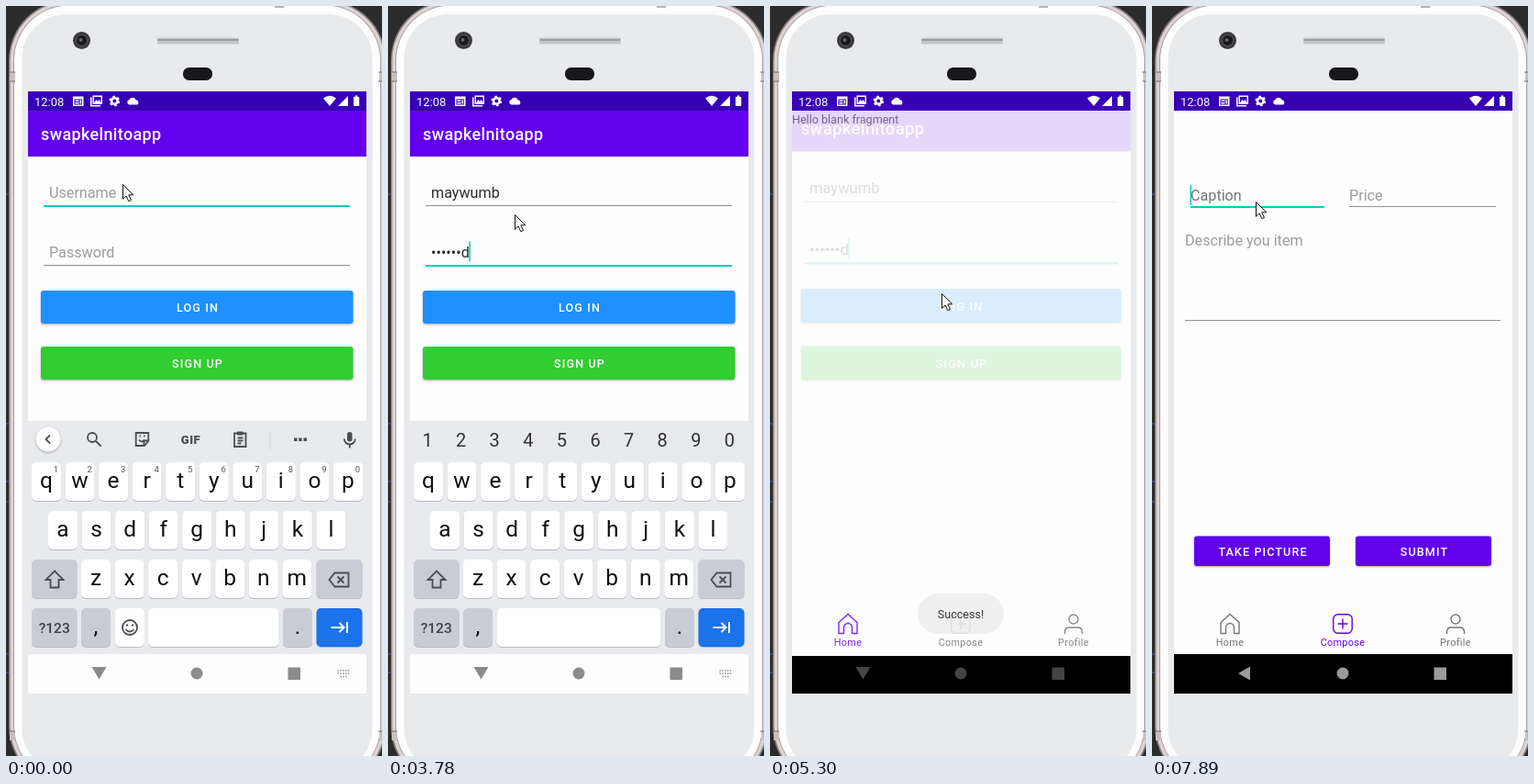
An HTML page that plays this animation: 410x817 px, repeating every 8000 ms.

```html
<!DOCTYPE html>
<html lang="en">
<head>
<meta charset="utf-8">
<title>App login</title>
<style>
html, body { margin: 0; width: 100%; height: 100%; overflow: hidden; background: #2b2b2b; }
svg { display: block; width: 410px; height: 817px; font-family: Roboto, sans-serif; }
text { white-space: pre; }
.mid { text-anchor: middle; }
.field { font-size: 16.16px; fill: #2b2b2b; }
.hint { fill: #9c9c9c; }
.btn { font-size: 12.57px; font-weight: 500; letter-spacing: 1.12px; fill: #fff; text-anchor: middle; }
.tab { font-size: 10.8px; letter-spacing: .36px; text-anchor: middle; fill: currentColor; }
.key { font-size: 24.5px; fill: #111; text-anchor: middle; }
.mode { font-size: 15.5px; font-weight: 500; fill: #3c4043; text-anchor: middle; }
.small { font-size: 9.5px; fill: #555; text-anchor: middle; }
.word { font-size: 16px; fill: #4a4d51; text-anchor: middle; }
.line { fill: none; stroke: #4a4d51; stroke-width: 1.8; }
.thin { fill: none; stroke: currentColor; stroke-width: 1.4; stroke-linejoin: round; }
.drop { filter: drop-shadow(0 1px .8px rgba(0,0,0,.33)); }
</style>
</head>
<body>
<svg viewBox="0 0 410 817">
  <defs><clipPath id="screen"><rect x="24" y="93" width="369" height="656"/></clipPath></defs>

  <g id="phone">
    <path d="M0 205h3M0 455h3M0 518h3M0 540h3M0 706h3M0 726h3" stroke="#4d63a8"/>
    <rect x="3" y="-6" width="411" height="856" rx="65" fill="#837b7c"/>
    <rect x="4.500" y="-4.500" width="408" height="853" rx="64" fill="#ddd3d3"/>
    <rect x="8" y="-1.500" width="401" height="847" rx="61" fill="#aaa1a2"/>
    <rect x="9" y="-.5" width="399" height="845" rx="60" fill="#fdfdfd"/>
    <rect x="17.500" y="9" width="382" height="826" rx="48" fill="#e8eaec"/>
    <path d="M4 72h6v10H4zM407 72h5v10h-5zM4 790h6v10H4zM407 790h5v10h-5z" fill="#c8bfbf"/>
    <path d="M4 72h6M4 82h6M406 72h6M406 82h6M4 790h6M406 790h6M293 1h10" stroke="#746d6e"/>
    <circle cx="82.500" cy="37.500" r="9.500" fill="#3b3b3d"/>
    <circle cx="82.500" cy="37.500" r="6" fill="#19191b" stroke="#5c5c60"/>
    <circle cx="81.500" cy="37" r="2" fill="#65656b"/>
    <rect x="165" y="34.500" width="89" height="7" rx="1.500" fill="#c3c5c8"/>
    <path d="M165.500 37h88" stroke="#8d8f93" stroke-width="1.300"/>
    <rect x="193" y="67" width="32" height="14" rx="6.500" fill="#18181a"/>
  </g>

  <g clip-path="url(#screen)">
    <rect x="24" y="93" width="369" height="656" fill="#fdfdfd"/>
    <g id="login">
      <rect x="20" y="85" width="377" height="29" fill="#3700b3"/>
      <rect x="20" y="114" width="377" height="50" fill="#6200ee"/>
      <text x="38" y="146" font-size="18" font-weight="500" letter-spacing=".35" fill="#fff">swapkelnitoapp</text>
      <text id="user" class="field" x="47" y="208.500"></text>
      <text id="pass" class="field" x="47" y="273.500"></text>
      <rect id="userLine" x="41" width="334"/>
      <rect id="passLine" x="41" width="334"/>
      <rect id="compose" x="47" y="210" height="1" fill="#333"/>
      <rect id="caret" width="1.500" height="22" fill="#03cdb9"/>
      <rect id="loginBtn" class="drop" x="38" y="310" width="340.500" height="36" rx="3"/>
      <text class="btn" x="209" y="333">LOG IN</text>
      <rect class="drop" x="38" y="371" width="340.500" height="36" rx="3" fill="#32cd32"/>
      <text class="btn" x="209" y="394">SIGN UP</text>
    </g>

    <g id="main">
      <rect x="24" y="93" width="369" height="21" fill="#3700b3"/>
      <rect x="24" y="114" width="369" height="594" fill="#fdfdfd"/>
      <text id="home" x="24" y="128" font-size="12.570" fill="#777">Hello blank fragment</text>
      <g id="form">
        <text id="caption" class="field" x="42" y="212">Caption</text>
        <text class="field hint" x="215" y="212">Price</text>
        <text class="field hint" x="36" y="261">Describe you item</text>
        <rect id="captionLine" x="42" width="146"/>
        <path d="M215 218.500h160M36 342.500h344" stroke="#939393"/>
        <rect id="captionCaret" x="41.500" y="195" width="1.500" height="22" fill="#03cdb9"/>
        <rect class="drop" x="46" y="577.500" width="148" height="32.500" rx="3" fill="#6200ee"/>
        <rect class="drop" x="222" y="577.500" width="148" height="32.500" rx="3" fill="#6200ee"/>
        <text class="btn" x="121" y="599">TAKE PICTURE</text>
        <text class="btn" x="297" y="599">SUBMIT</text>
      </g>
      <circle id="ripple" cx="208" cy="679" r="31" fill="#6200ee" opacity=".1"/>
      <g id="homeTab">
        <path class="thin" d="M75 671.500 85 662.500l10 9V683.500H89.500V677a4.500 4.500 0 0 0-9 0v6.500H75z"/>
        <text class="tab" x="85" y="696.500">Home</text>
      </g>
      <g id="composeTab">
        <rect class="thin" x="197.700" y="662.700" width="20.500" height="20.500" rx="5"/>
        <path class="thin" d="M202.500 673h11M208 667.500v11"/>
        <text class="tab" x="208" y="696.500">Compose</text>
      </g>
      <g color="#757575">
        <circle class="thin" cx="331" cy="668" r="5"/>
        <path class="thin" d="M321.500 684v-2q0-5 5-5h9q5 0 5 5v2"/>
        <text class="tab" x="331" y="696.500">Profile</text>
      </g>
    </g>

    <g id="keyboard">
      <rect x="24" y="452" width="369" height="255" fill="#e8eaed"/>
      <g id="keys"></g>
      <g id="digits"></g>
      <g id="strip">
        <circle class="drop" cx="46" cy="472" r="13.500" fill="#fff"/>
        <path id="chevron" class="line"/>
        <rect x="372" y="464" width="5.500" height="10.500" rx="2.700" fill="#4a4d51"/>
        <path class="line" stroke-width="1.500" d="M368.800 471.500a6 6 0 0 0 12 0M374.800 477.500v4"/>
      </g>
      <g id="tools">
        <circle class="line" cx="94" cy="470" r="5"/><path class="line" stroke-width="2.200" d="m98 474 5.500 5.500"/>
        <path class="line" d="M141.700 465h13.600v9l-4.500 5h-9.100zM155 473.500h-4.500v5"/>
        <path class="line" d="M145 472.500q3 4 6 0M145.500 468.500h1.500M150 468.500h1.500" stroke-width="1.400"/>
        <text class="mid" x="201.500" y="476.500" font-size="13" font-weight="900" fill="#4a4d51" letter-spacing=".5">GIF</text>
        <path class="line" d="M249 465.500h12.500v14.500H249zM252.500 470.500h6M252.500 473.500h6M252.500 476.500h4" stroke-width="1.500"/>
        <path d="M252 463.500h6.500v4H252z" fill="#4a4d51"/>
        <path d="M288 463v20" stroke="#cfd1d5"/>
        <path d="M314 470.500h3.500v3.500H314zM319.200 470.500h3.500v3.500h-3.500zM324.500 470.500h3.500v3.500h-3.500z" fill="#4a4d51"/>
      </g>
      <g id="words">
        <text class="word" x="105" y="478.500"></text>
        <text class="word" x="207" y="478.500"></text>
        <text class="word" x="309" y="478.500"></text>
        <path d="M153.500 462v20M261.500 462v20" stroke="#c9cbcf"/>
      </g>
    </g>

    <g id="nav">
      <rect id="navBack" x="24" width="369" height="45"/>
      <path id="backIcon"/>
      <circle cx="208" cy="727" r="6.500"/>
      <rect x="307.500" y="720.500" width="13.500" height="13.500"/>
      <path id="imeIcon" d="M361.500 724h13M361.500 727h13M364.500 730.500h7" stroke="#8d8d8d" stroke-width="1.500" stroke-dasharray="1.600 1.200"/>
    </g>

    <g id="status" fill="#fff">
      <text x="31" y="108.500" font-size="13">12:08</text>
      <path fill-rule="evenodd" d="M73 98.500h11.500v10.500H73zM74.500 101.500v6h8.500v-6zM75.500 102.500h4v1.500h-4zM75.500 105h4v1.500h-4zM80.500 102.500h1.700v4h-1.700z"/>
      <path fill-rule="evenodd" d="M92 99.500h1.500v8.500h9.500v1.500H92zM94.500 97.500h10.500v9.500H94.500zM96 99v6.500h7.500V99zM96 105.500l2.500-3.500 1.700 2 1.500-2 1.800 3.500z"/>
      <circle cx="118.300" cy="103.500" r="3.300" fill="none" stroke="#fff" stroke-width="2.600"/>
      <circle cx="118.300" cy="103.500" r="5" fill="none" stroke="#fff" stroke-width="1.700" stroke-dasharray="2.620 2.620"/>
      <path d="M134.500 107.500a2.800 2.800 0 0 1 0-5.500 4 4 0 0 1 7.300.5 2.500 2.500 0 0 1 .2 5z"/>
      <path d="M346 100.500q7-5.500 14 0l-7 8.500zM362 109h11V98zM379 99h1.700v-1.500h2.600V99h1.900v10H379z"/>
    </g>

    <g id="toast">
      <rect x="161" y="640" width="94" height="44" rx="22" fill="#eee" fill-opacity=".95"/>
      <text class="mid" x="208" y="667" font-size="12.570" fill="#222">Success!</text>
    </g>
  </g>

  <path id="cursor" d="M.5.5v15.800l3.600-3.400 2.700 5.800 2.700-1.200-2.700-5.700h4.900z" fill="#fff" stroke="#111"/>
</svg>

<script>
const $ = id => document.getElementById(id);
const LOOP = 8000, TEAL = '#03cdb9', GREY = '#8e8e8e', PURPLE = '#6200ee';

function key(x, y, w, label = '', fill = '#fff', cls = 'key') {
  const drop = cls === 'key' ? 28 : 27;
  return `<rect x="${x}" y="${y + 1}" width="${w}" height="42" rx="5" fill="#b9bcc1"/>
    <rect x="${x}" y="${y}" width="${w}" height="42" rx="5" fill="${fill}"/>
    <text class="${cls}" x="${x + w / 2}" y="${y + drop}">${label}</text>`;
}

function buildKeyboard() {
  const dark = '#c9ccd2';
  const row = (letters, x, y) => [...letters].map((c, i) => key(x + i * 36.55, y, 32, c)).join('');
  const digits = [...'1234567890'];
  $('keys').innerHTML = row('qwertyuiop', 28, 497) + row('asdfghjkl', 46, 550) + row('zxcvbnm', 82, 603)
    + key(28, 603, 49.5, '', dark) + key(338.5, 603, 50, '', dark)
    + key(28, 656, 49.5, '?123', dark, 'mode') + key(82, 656, 32, ',', dark) + key(302, 656, 32, '.', dark)
    + key(338.5, 656, 50, '', '#1a73e8')
    + `<g id="wideSpace">${key(119, 656, 178.5)}</g>
       <g id="emojiRow">${key(119, 656, 32)}${key(155, 656, 142.5)}
         <circle class="line" cx="135" cy="677" r="8"/>
         <path class="line" d="M130.500 679q4.500 5 9 0M131 674.500h2M137 674.500h2"/>
         ${digits.map((d, i) => `<text class="small" x="${54.5 + i * 36.55}" y="508">${d}</text>`).join('')}</g>
       <path class="line" d="M53 615.500 62.500 625H57.500v8.500h-9V625h-5z"/>
       <path class="line" d="M358.500 617.500H373.500v15H358.500L352.500 625zM361.500 621.500l7 7M368.500 621.500l-7 7"/>
       <path class="line" style="stroke:#fff;stroke-width:2" d="M354.500 677H368M363.500 672l5 5-5 5M372 671v12"/>`;
  $('digits').innerHTML = digits.map((d, i) =>
    `<text class="mid" x="${43 + i * 36.6}" y="480" font-size="20" fill="#333">${d}</text>`).join('');
}

// Each track lists [start time, value]; a value holds until the next one.
const tracks = {
  cursor: [[0, [127, 194]], [400, [133, 211]], [650, [138, 227]], [4450, [146, 240]], [4590, [163, 269]],
    [4730, [180, 299]], [4870, [187, 313]], [5880, [204, 392]], [6010, [234, 566]], [6150, [193, 667]],
    [6280, [198, 675]], [6410, [201, 679]], [6940, [196, 640]], [7070, [179, 525]], [7200, [151, 380]],
    [7330, [128, 276]], [7460, [116, 226]], [7590, [113, 213]]],
  user: [[0, 0], [1330, 1], [1460, 2], [1720, 3], [1850, 4], [1990, 5], [2120, 6], [2260, 7]],
  words: [[0, null], [1460, ['me', 'my', 'more']], [1590, ['ma', 'maybe', 'may']], [1990, ['may', 'maybe', 'mayor']]],
  pass: [[0, 0], ...[0, 1, 2, 3, 4, 5, 6].map(i => [2910 + i * 145, i + 1])],
  caret: [[0, 0], [400, 1], [930, 0], [1330, 1], [4310, 0], [4730, 1]],
  scale: [[0, 1], [5150, 1.006], [5300, 1.025]],
  main: [[0, 0], [5300, .85], [5450, 1]],
  toast: [[0, 0], [5150, .47], [5300, .9], [5450, 1], [7200, .5], [7330, 0]]
};
const at = (name, t) => tracks[name].findLast(step => step[0] <= t)[1];
const show = (id, on) => { $(id).style.display = on ? '' : 'none'; };
const set = (id, attrs) => { for (const k in attrs) $(id).setAttribute(k, attrs[k]); };

function fill(id, text, hint) {
  const el = $(id), value = text || hint;
  if (el.textContent !== value) el.textContent = value;
  el.classList.toggle('hint', !text);
  return text ? el.getComputedTextLength() : 0;
}

function underline(id, y, active) {
  set(id, { y, height: active ? 2 : 1, fill: active ? TEAL : GREY });
}

function drawLogin(t) {
  const onPass = t >= 2380, typed = at('pass', t);
  const userWidth = fill('user', 'maywumb'.slice(0, at('user', t)), 'Username');
  const secret = typed ? '•'.repeat(typed - 1) + 'sunwood'[typed - 1] : '';
  const passWidth = fill('pass', secret, 'Password');
  underline('userLine', 217, !onPass);
  underline('passLine', 282, onPass);
  set('compose', { width: onPass ? 0 : userWidth });
  set('caret', { x: 46.5 + (onPass ? passWidth : userWidth), y: onPass ? 256.5 : 191.5 });
  show('caret', at('caret', t));
  set('loginBtn', { fill: t >= 5000 && t < 5150 ? '#4da6ff' : '#1e90ff' });
  const s = at('scale', t);
  set('login', { transform: `translate(208.5 390) scale(${s}) translate(-208.5 -390)` });

  const words = at('words', t);
  show('keyboard', t < 5150);
  show('strip', !onPass);
  show('emojiRow', !onPass);
  show('wideSpace', onPass);
  show('digits', onPass);
  show('tools', !onPass && !words);
  show('words', !onPass && words);
  if (words) $('words').querySelectorAll('text').forEach((el, i) => { el.textContent = words[i]; });
  set('chevron', { d: words ? 'M44 467.500l4.500 4.500-4.500 4.500' : 'M48 467.500l-4.500 4.500 4.500 4.500' });
}

function drawMain(t) {
  const form = t >= 6810, focused = t >= 7890;
  set('main', { opacity: at('main', t) });
  show('home', !form);
  show('form', form);
  show('ripple', t >= 6540 && t < 6940);
  set('homeTab', { color: form ? '#757575' : PURPLE });
  set('composeTab', { color: form ? PURPLE : '#757575' });
  $('caption').style.fill = focused ? '#757575' : '#9c9c9c';
  underline('captionLine', 218, focused);
  show('captionCaret', focused);
}

function drawSystem(t) {
  const black = t >= 5150, home = t >= 5450;
  set('navBack', { y: black && !home ? 708 : 706, fill: black ? '#000' : '#fdfdfd' });
  set('nav', { fill: !black ? '#8b8b8b' : home ? '#9b9b9b' : '#444' });
  set('backIcon', { d: home ? 'M94 727l13-7.500v15z' : 'M93.500 720h16l-8 13.500z' });
  show('imeIcon', !black);
  set('toast', { opacity: at('toast', t) });
  set('cursor', { transform: `translate(${at('cursor', t)})` });
}

buildKeyboard();
const start = performance.now();
function frame() {
  const t = (performance.now() - start) % LOOP;
  drawLogin(t);
  drawMain(t);
  drawSystem(t);
  requestAnimationFrame(frame);
}
frame();
</script>
</body>
</html>
```
